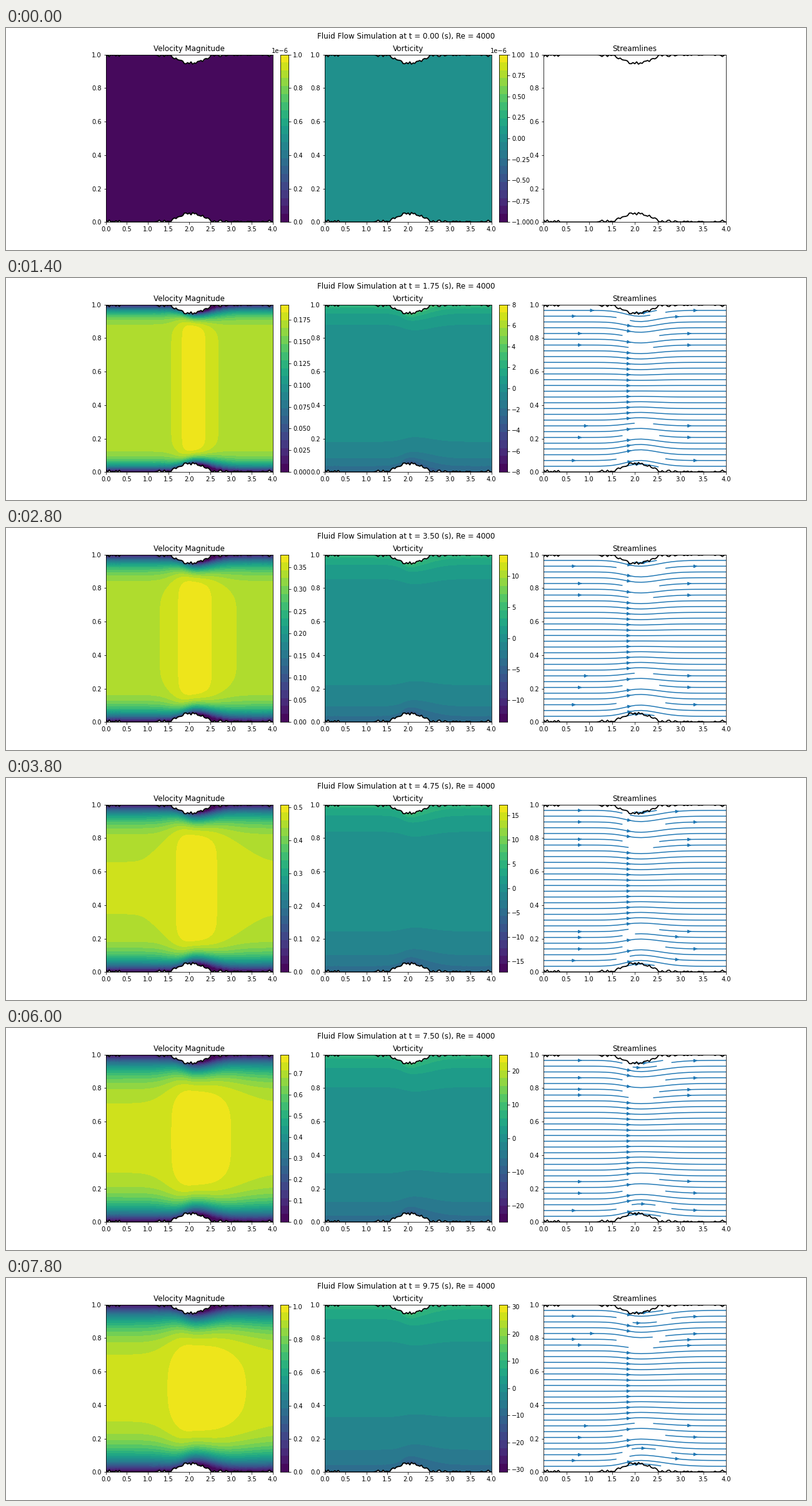
Recreate the animation shown at these times as a matplotlib script. Size 1280 px wide and 356 px high, loop 8000 ms.

```python
import math

import matplotlib.pyplot as plt
import numpy as np
from matplotlib.animation import FuncAnimation
from matplotlib.colors import ListedColormap

W, H, DPI = 1280, 356, 72
FRAMES, INTERVAL, DT = 40, 200, 0.25
BANDS = 21
PANEL_STEP, TOP, BOTTOM = 350.1, 42.7, 311.2

plt.rcParams["font.family"] = "DejaVu Sans"
plt.rcParams["font.size"] = 9.88

cmap = ListedColormap(plt.cm.viridis((np.arange(BANDS) + 0.5) / BANDS))

# Rough wall with a hump in the middle, mirrored on the upper side
rng = np.random.default_rng(4)
wall_x = np.linspace(0, 4, 101)
hump = 0.05 * np.maximum(np.cos(math.pi * (wall_x - 2.03) / 1.05), 0)
hump[np.abs(wall_x - 2.03) > 0.525] = 0
calm = (wall_x > 0.33) & (wall_x < 1.2)
grain = np.where(calm, 0, rng.uniform(-0.011, 0.013, wall_x.size))
wall_y = np.maximum(hump + grain * np.where(hump > 0, 0.7, 1), 0)

# Boundary layer profile under a steadily accelerating core
ETA = np.linspace(0, 4, 401)
PROFILE = np.array([
    1 - (1 + 2 * e * e) * math.erfc(e)
    + 2 / math.sqrt(math.pi) * e * math.exp(-e * e) for e in ETA])


def layer_speed(eta):
    return np.interp(eta, ETA, PROFILE)


def thickness(t):
    return 0.081 * math.sqrt(t)


def bell(x, mid, left, right):
    return np.exp(-0.5 * ((x - mid) / np.where(x < mid, left, right)) ** 2)


def wall(x):
    return np.interp(x, wall_x, wall_y)


def wall_gap(x, y):
    """Effective distance to the wall, shortened in the wake of the hump."""
    near = np.minimum(y, 1 - y)
    wake = 0.055 * bell(x, 2.15, 0.25, 0.4)
    rough = (wall(x) - wake) * np.exp(-near / 0.02)
    return np.maximum(near - wake * np.exp(-near / 0.3) - rough, 0)


gx, gy = np.meshgrid((np.arange(267) + 0.5) * 4 / 267,
                     (np.arange(268) + 0.5) / 268)
gap = wall_gap(gx, gy)
sx, sy = np.meshgrid(np.linspace(0, 4, 101), np.linspace(0, 1, 81))
stream_gap = np.maximum(np.minimum(sy, 1 - sy) - wall(sx), 0)


def speed(t):
    """Speed as a share of the scale's upper limit."""
    if t == 0:
        return np.zeros_like(gx)
    free = 0.877 + 0.0065 * t - 0.0001 * t * t
    throat = bell(gx, 2.07, 0.45 - 0.3 * math.exp(-t / 3.5), 0.2 + 0.075 * t)
    core = free + (0.988 - free) * throat
    eta = gap / thickness(t)
    return core * layer_speed(eta * (1 + 0.45 * throat * eta / (0.5 + eta)))


def vorticity(t):
    """Vorticity from -1 to 1 as a share of the scale's limit."""
    if t == 0:
        return np.zeros_like(gx)
    young = math.exp(-t / 2)
    eta = gap / (thickness(t) * (1 + 0.5 * young))
    upper = gy > 0.5
    layer = (0.3 + 0.12 * young) * np.exp(-np.where(upper, 2.1, 1.43) * eta)
    tip = 0.4 * bell(gx, 1.95, 0.08, 0.16) * np.exp(-gap / 0.02)
    return np.where(upper, 1, -1) * (layer + tip)


def flow(t):
    """Velocity that follows lines squeezed together over the hump."""
    mid, left, right = 2.1, 0.3, 0.34 + 0.02 * t
    lift = 0.038 * bell(sx, mid, left, right)
    slope = -lift * (sx - mid) / np.where(sx < mid, left, right) ** 2
    share = (sy - lift) / (1 - 2 * lift)
    u = layer_speed(stream_gap / thickness(t))
    return u, u * slope * (1 - 2 * share)


fig = plt.figure(figsize=(W / DPI, H / DPI), dpi=DPI, facecolor="white")
heading = fig.suptitle("")


def add_axes(left, width):
    return fig.add_axes([left / W, 1 - BOTTOM / H,
                         width / W, (BOTTOM - TOP) / H])


def add_panel(index, title, width):
    ax = add_axes(160 + PANEL_STEP * index, width)
    ax.set_title(title)
    ax.set_xlim(0, 4)
    ax.set_ylim(0, 1)
    for edge, line in ((0, wall_y), (1, 1 - wall_y)):
        ax.fill_between(wall_x, edge, line, color="white", lw=0, zorder=1)
        ax.plot(wall_x, line, color="black", lw=1.8, zorder=2.4)
    return ax


def add_image(ax, data, right):
    return ax.imshow(data, extent=(0, right, 0, 1), origin="lower",
                     aspect="auto", interpolation="nearest", cmap=cmap,
                     vmin=0, vmax=1)


def add_field(index, title):
    image = add_image(add_panel(index, title, 266.7), np.zeros_like(gx), 4)
    bar = add_axes(160 + PANEL_STEP * index + 278.7, 13.2)
    bands = add_image(bar, (np.arange(BANDS)[:, None] + 0.5) / BANDS, 1)
    bar.set_xticks([])
    bar.yaxis.tick_right()
    bar.yaxis.set_offset_position("right")
    return image, bar, bands


def set_scale(bar, bands, low, high):
    bands.set_extent((0, 1, low, high))
    bar.set_ylim(low, high)


speed_image, speed_bar, speed_bands = add_field(0, "Velocity Magnitude")
vort_image, vort_bar, vort_bands = add_field(1, "Vorticity")
stream_ax = add_panel(2, "Streamlines", 291.8)
solids = list(stream_ax.collections)


def draw_streams(t):
    for item in [*stream_ax.patches, *stream_ax.collections]:
        if item not in solids:
            item.remove()
    if t > 0:
        stream_ax.streamplot(sx, sy, *flow(t), color="C0", linewidth=1.5)
        stream_ax.set_xlim(0, 4)
        stream_ax.set_ylim(0, 1)


def update(frame):
    t = frame * DT
    heading.set_text(f"Fluid Flow Simulation at t = {t:.2f} (s), Re = 4000")
    root = math.sqrt(t)
    top = 1e-6 + t * (0.1143 - 0.0033 * root)
    limit = 1e-6 + 3.23 * root + 2.13 * t
    speed_image.set_data(speed(t))
    vort_image.set_data(0.5 + 0.5 * vorticity(t))
    set_scale(speed_bar, speed_bands, 0, top)
    set_scale(vort_bar, vort_bands, -limit, limit)
    draw_streams(t)
    return []


anim = FuncAnimation(fig, update, frames=FRAMES, interval=INTERVAL,
                     init_func=lambda: update(0), repeat=True,
                     repeat_delay=0, blit=False)
plt.show()
```
